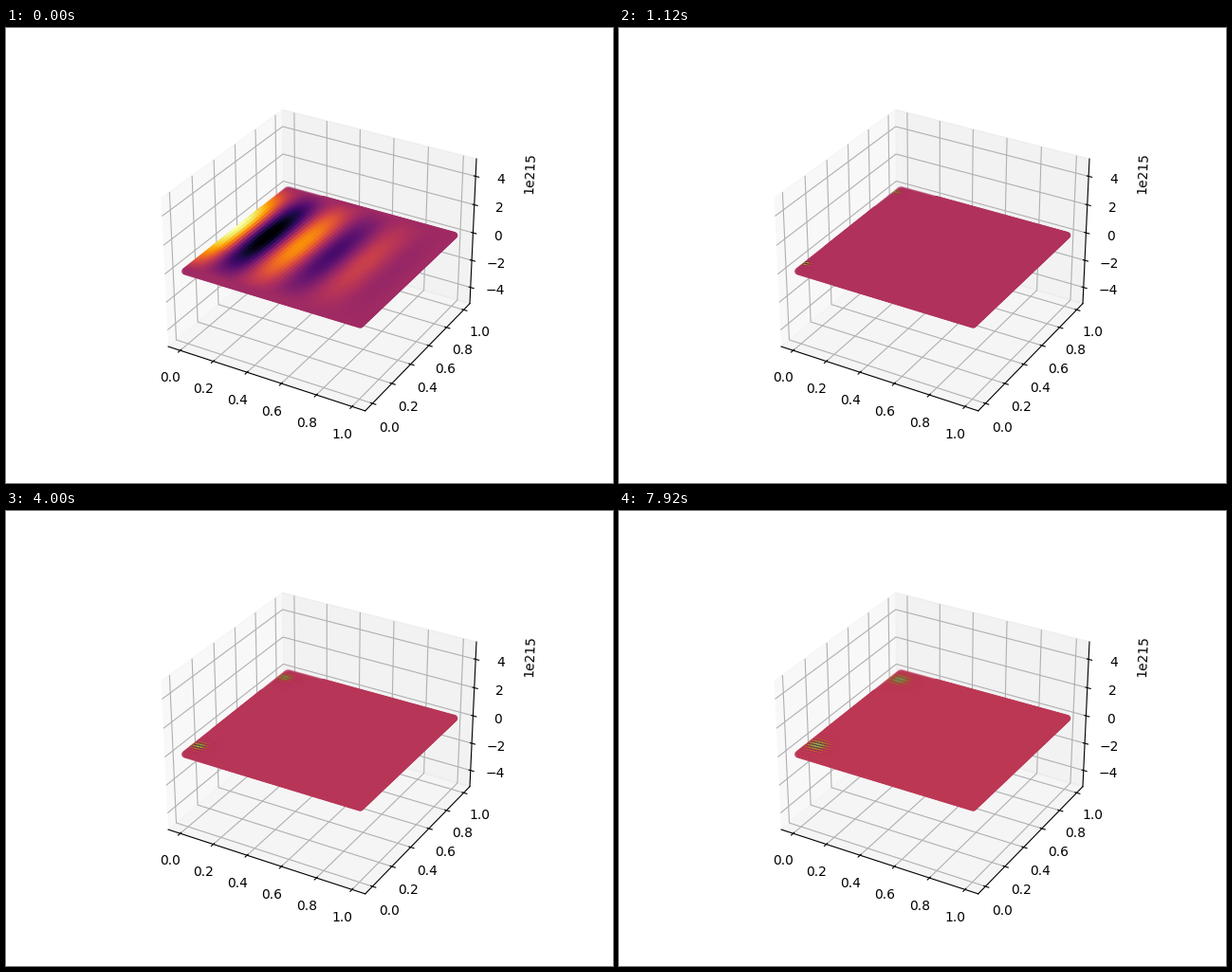
Animation of 640x480 px, one loop 8 s. Source, as a matplotlib script:

```python
import numpy as np
import matplotlib.pyplot as plt
from matplotlib.animation import FuncAnimation

FRAMES, INTERVAL = 100, 80
N = 100
MARGIN = 1 / 48
INFERNO = plt.get_cmap("inferno")

# Dense points where the ripple needs detail, sparse ones elsewhere
i, j = (g.ravel() for g in np.meshgrid(np.arange(N + 1), np.arange(N + 1), indexing="ij"))
fine = (i < 22) & ((j < 26) | (j > N - 26))
rim = (i % N == 0) | (j % N == 0)
keep = fine | rim | ((i % 2 == 0) & (j % 2 == 0))
i, j, fine = i[keep], j[keep], fine[keep]
x, y = i / N, j / N
nearness = (0.433 * x - 0.75 * y + 0.75) / 1.183
alpha = np.where(fine, 0.3 + 0.7 * nearness, 1)


def wave(k):
    """Damped stripes fading until only the driven edge stands out."""
    s = min(k / 9, 1)
    stripes = np.cos(2 * np.pi * x / 0.385)
    early = 0.57 * (1 - x) ** 1.15 * stripes
    late = 0.09 * (1 - x**4) * stripes + 0.62 * np.exp(-x / 0.05)
    level = 0.43 + (0.305 - 0.43) * s
    return level + np.sin(np.pi * y) * ((1 - s) * early + s * late)


def ripple(k):
    """Alternating grid noise spreading slowly from two corners."""
    r = np.sqrt(max(k, 8))
    cx, cy, width = -0.017 + 0.0068 * r, 0.037 + 0.0061 * r, 0.004 * r
    edge_y = np.minimum(y, 1 - y)
    bump = np.exp(-((x - cx) ** 2 + (edge_y - cy) ** 2) / (2 * width**2))
    return bump * (-1.0) ** (i + j + k)


def colors(k):
    growth = 0.12 * 6.0 ** (k - 9)
    share = growth / (1 + growth)
    level = np.interp(k, [14, 25, 34, 66, 99], [0.47, 0.53, 0.49, 0.488, 0.503])
    value = (1 - share) * wave(k) + share * (level + 0.5 * ripple(k))
    rgba = INFERNO(np.clip(value, 0, 1))
    rgba[:, 3] = alpha
    return rgba


fig = plt.figure(figsize=(6.4, 4.8), dpi=100)
ax = fig.add_subplot(projection="3d")
plate = ax.scatter(x, y, np.zeros_like(x), c=colors(0), s=20, depthshade=False)
ax.set_xlim(-0.05, 1.05, view_margin=MARGIN)
ax.set_ylim(-0.05, 1.05, view_margin=MARGIN)
ax.set_zlim(-5e215, 5e215, view_margin=MARGIN)


def update(k):
    plate.set_facecolor(colors(k))
    return (plate,)


anim = FuncAnimation(fig, update, frames=FRAMES, interval=INTERVAL, repeat=True, repeat_delay=0)
plt.show()
```
